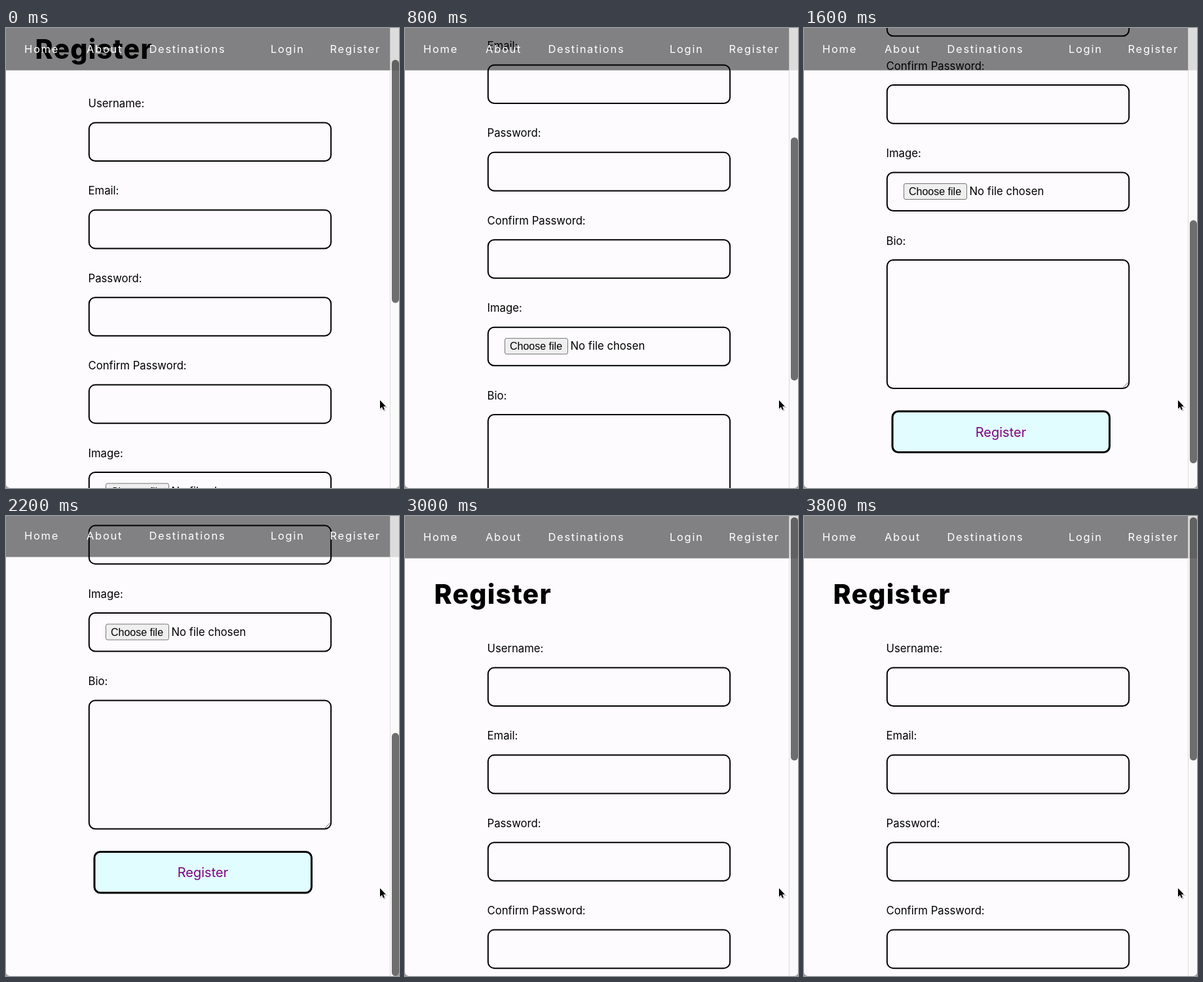
An HTML page for the animation above (4100 ms loop, 600 by 702 pixels).

```html
<!DOCTYPE html>
<html lang="en">
<head>
<meta charset="utf-8">
<title>Register form</title>
<style>
  html, body { margin: 0; width: 100%; height: 100%; overflow: hidden; background: #fdfbfe; }
  svg { display: block; width: 600px; height: 702px; font-family: Inter, "Open Sans", sans-serif; }
  .label { font-size: 16.7px; }
  .nav { font-size: 16.5px; letter-spacing: 1.7px; fill: #fff; }
  .title { font-size: 41px; font-weight: 800; letter-spacing: 1.2px; }
  .native { font: 16px "Liberation Sans", Arial, sans-serif; }
  .field { fill: none; stroke: #000; stroke-width: 2; }
</style>
</head>
<body>
<svg viewBox="0 0 600 702">
  <rect width="600" height="702" fill="#fdfbfe"/>

  <g id="page">
    <text class="title" x="44.5" y="134">Register</text>
    <g id="fields"></g>
    <rect x="152.5" y="782" width="96" height="24" rx="2.5" fill="#efefef" stroke="#767676"/>
    <text class="native" x="160" y="799.5">Choose file</text>
    <text class="label" x="252.5" y="799.5">No file chosen</text>
    <path d="M487 1093l7.500-7.500M491.500 1093l3.500-3.500" stroke="#666" fill="none"/>
    <rect x="135" y="1129.500" width="331.500" height="62.500" rx="9" fill="#e2fdff" stroke="#000" stroke-width="3"/>
    <text x="300.500" y="1168" font-size="20" fill="#800080" text-anchor="middle">Register</text>
  </g>

  <rect x="586" width="14" height="702" fill="#fafafa"/>
  <path d="M586.5 0V702" stroke="#dcdcdc"/>
  <rect id="thumb" x="589" width="11" height="371" rx="5.5" fill="#6e6e6e"/>

  <g id="bar">
    <rect y="-20" width="586" height="84.600" id="shade" fill="#000" fill-opacity=".49"/>
    <rect x="586" y="-20" width="14" height="84.600" fill="#000" fill-opacity=".12"/>
    <g id="links"></g>
  </g>

  <path d="M0 696.500Q1 701 6 702H0ZM600 697.500Q599 701 595 702H600Z" fill="#a2a2a2"/>
  <path d="M571.500 568.300v13l3-2.700 2 4.600 2-.900-1.900-4.500h3.900z" transform="translate(.8 1.200)"
        fill="#000" fill-opacity=".15" stroke="#000" stroke-opacity=".1" stroke-width="2"/>
  <path d="M571 568v13l3-2.700 2 4.600 2-.900-1.900-4.500h3.900z" stroke="#fff" stroke-width="1.600"
        stroke-linejoin="round" paint-order="stroke"/>
</svg>

<script>
const $ = id => document.getElementById(id);
const LOOP = 4100, STEP = 100, MAX = 615;

const labels = ["Username:", "Email:", "Password:", "Confirm Password:", "Image:", "Bio:"];
$("fields").innerHTML = labels.map((name, i) => {
  const y = i * 133.4, h = name === "Bio:" ? 196.2 : 58.6;
  return `<text class="label" x="125.500" y="${208 + y}">${name}</text>
    <rect class="field" x="126.800" y="${231.4 + y}" width="369.400" height="${h}" rx="9.500"/>`;
}).join("");

const links = [["Home", 28], ["About", 123], ["Destinations", 218.5], ["Login", 404], ["Register", 494.5]];
$("links").innerHTML = links.map(([name, x]) =>
  `<text class="nav" x="${x}" y="38">${name}</text>`).join("");

// Scroll stops: time in ms, offset in px; values outside 0..MAX are the elastic bounce.
const stops = [
  [0, 87], [400, 212], [1200, 407], [1600, 544.5], [1800, 596], [2050, 619],
  [2200, 617], [2400, 612], [2650, 380], [2900, 48], [3000, 0],
  [3120, -7], [3300, -3], [3500, 0], [LOOP, 0]
];

const slope = i => (stops[i + 1][1] - stops[i][1]) / (stops[i + 1][0] - stops[i][0]);

// Tangent that never overshoots its neighbours.
function tangent(i) {
  if (i === 0) return slope(0);
  if (i === stops.length - 1) return slope(i - 1);
  const a = slope(i - 1), b = slope(i);
  return a * b <= 0 ? 0 : 2 * a * b / (a + b);
}

function scrollAt(t) {
  let i = 0;
  while (t >= stops[i + 1][0]) i++;
  const [t0, y0] = stops[i], [t1, y1] = stops[i + 1];
  const d = t1 - t0, u = (t - t0) / d, v = 1 - u;
  return y0 * v * v * (1 + 2 * u) + y1 * u * u * (3 - 2 * u)
    + d * u * v * (tangent(i) * v - tangent(i + 1) * u);
}

function draw(ms) {
  const t = Math.floor((ms % LOOP) / STEP) * STEP;
  const y = scrollAt(t);
  const inside = Math.max(0, Math.min(MAX, y));
  $("page").setAttribute("transform", `translate(0 ${-y})`);
  $("bar").setAttribute("transform", `translate(0 ${inside - y})`);
  // The bar moves down with the bounce, leaving bare page above it.
  for (const r of $("bar").querySelectorAll("rect")) {
    r.setAttribute("y", y < 0 ? 0 : -20);
    r.setAttribute("height", y < 0 ? 64.6 : 84.6);
  }
  $("thumb").setAttribute("y", 2 + inside * 0.535);
}

const start = performance.now();
function tick() {
  draw(performance.now() - start);
  requestAnimationFrame(tick);
}
tick();
</script>
</body>
</html>
```
